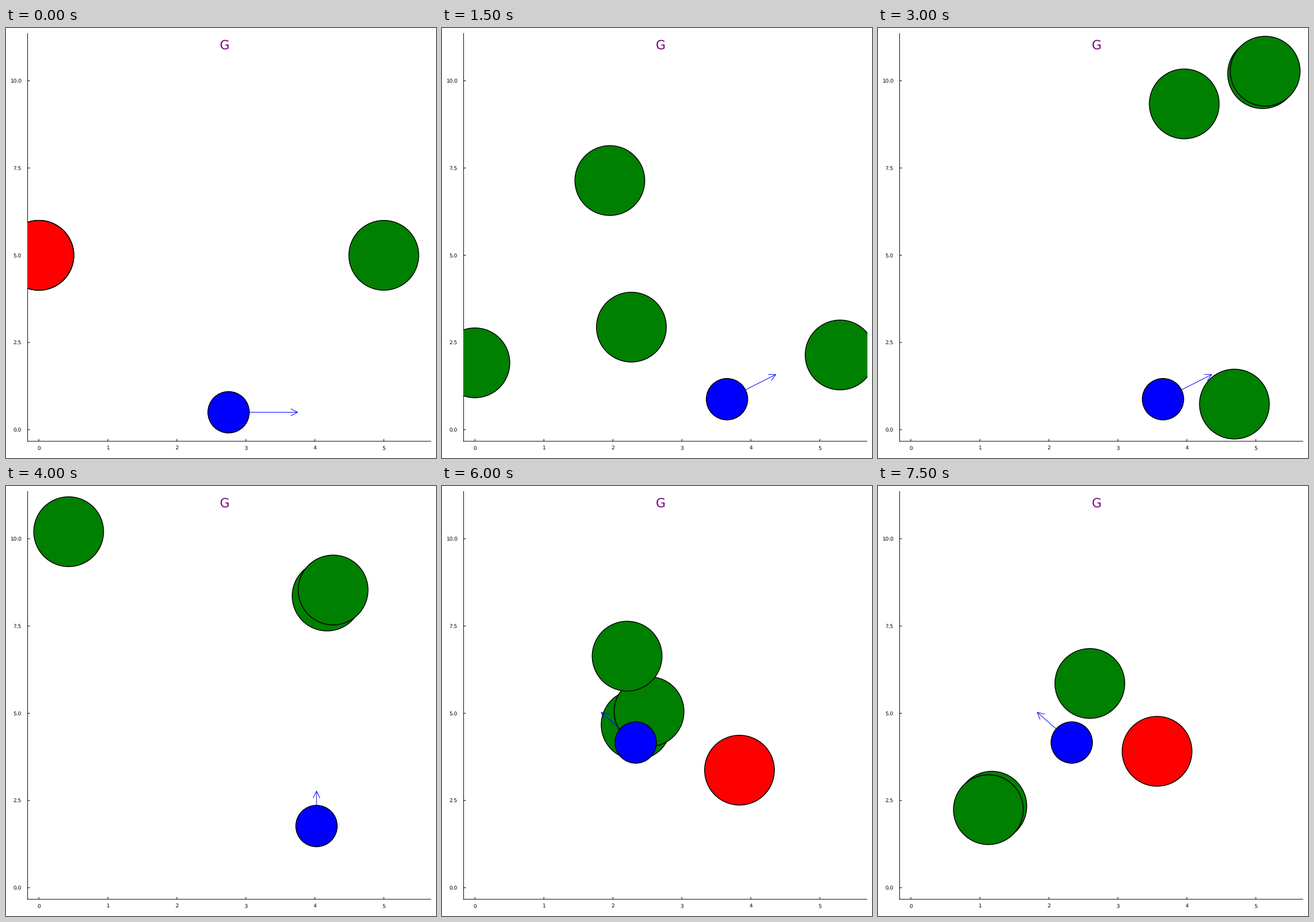
A matplotlib script that plays this animation: 748 px wide and 748 px high, repeating every 8000 ms.

```python
import numpy as np
import matplotlib.pyplot as plt
from matplotlib.animation import FuncAnimation
from matplotlib.patches import Circle, Rectangle

plt.rcParams["text.hinting"] = "no_hinting"

SIZE, DPI = 748, 64
PT = 72 / DPI                      # points per pixel
FRAMES, INTERVAL = 16, 500
X0, Y0 = 57.2, 698.8               # data origin in pixels
UNIT = np.array([120, -60.7])      # pixels per data unit
LEFT, TOP, RIGHT, BOTTOM = 37.6, 9, 739.5, 718.9
GATE = (0, X0, 395.4)

# Discs in stacking order: way points (step, x, y) joined at constant speed,
# and the span of steps on which the disc is red.
DISCS = [
    ([GATE, (2, X0, 524.7), (4, X0, 640.2)], (4, 4)),
    ([(6, 669, 79.4), (12, 337.7, 415.4), (15, 198, 557)], None),
    ([(0, 657.2, 395.4), (2, 679, 502.5), (4, 706, 635)], None),
    ([(6, 673.5, 75.1), (12, 360.2, 392.5), (15, 192, 563)], None),
    ([GATE, (4, 420.2, 562), (6, 620, 654.2)], None),
    ([(8, 109, 79.5), (12, 322, 296), (14, 419, 394.8), (15, 368.5, 343.5)],
     None),
    ([GATE, (4, 370.2, 222), (7, 614, 87)], (0, 0)),
    ([(9, 675.5, 654.5), (10, 616.4, 594.2), (12, 517.5, 494.3),
      (14, 429.5, 404.8), (15, 485.4, 461.5)], (9, 15)),
]

# The agent goes one stride, turns by this many degrees, goes another stride.
TURNS = {2: 45, 8: 45, 9: 45, 10: 0, 11: -15}
STRIDE, FADE = 0.53, 0.987

fig = plt.figure(figsize=(SIZE / DPI, SIZE / DPI), dpi=DPI, facecolor="white")
ax = fig.add_axes([0, 0, 1, 1])
ax.set(xlim=(0, SIZE), ylim=(SIZE, 0))
ax.axis("off")
clip = Rectangle((37, TOP), 703, 710, transform=ax.transData)


def disc(radius, color, z):
    patch = Circle((0, 0), radius, fc=color, ec="black", lw=1.5 * PT, zorder=z)
    ax.add_patch(patch)
    patch.set_clip_path(clip)
    return patch


def line(xs, ys, color="black", z=0):
    return ax.plot(xs, ys, color=color, lw=PT, zorder=z, snap=False,
                   solid_capstyle="butt")[0]


def label(x, y, text, px, color="black", ha="center"):
    ax.text(x, y, text, fontsize=px * PT, color=color, ha=ha, va="baseline",
            family="DejaVu Sans", zorder=0)


def draw_axes():
    line([LEFT, LEFT], [TOP, BOTTOM + 0.5])
    line([LEFT - 0.5, RIGHT], [BOTTOM, BOTTOM])
    for n in range(6):
        x = X0 + n * UNIT[0]
        line([x, x], [BOTTOM, BOTTOM - 4])
        label(x, 733.4, str(n), 9)
    for v in np.arange(0, 10.1, 2.5):
        y = Y0 + v * UNIT[1]
        line([LEFT, LEFT + 4], [y, y])
        label(27, y + 3.3, f"{v:.1f}", 9, ha="right")
    label(380.3, 36.6, "G", 22, "purple")


draw_axes()
discs = [disc(60.7, "green", i + 1) for i in range(len(DISCS))]
shaft = line([], [], "blue", 20)
head = line([], [], "blue", 20)
agent = disc(36, "blue", 21)


def ahead(deg):
    a = np.radians(deg)
    return np.array([np.cos(a), np.sin(a)])


def agent_pose(step):
    pos, deg, stride = np.array([2.75, 0.5]), 0, STRIDE
    for when, turn in TURNS.items():
        if when <= step:
            pos = pos + stride * (ahead(deg) + ahead(deg + turn))
            deg += turn
            stride *= FADE
    return (X0, Y0) + pos * UNIT, ahead(deg) * UNIT


def place_agent(step):
    center, vec = agent_pose(step)
    tip = center + vec
    unit = vec / np.hypot(*vec)
    side = 6 * np.array([-unit[1], unit[0]])
    back = tip - 11.8 * unit
    agent.center = center
    shaft.set_data(*zip(center, tip))
    head.set_data(*zip(back + side, tip, back - side))


def update(step):
    for patch, (path, red) in zip(discs, DISCS):
        steps, xs, ys = zip(*path)
        patch.set_visible(steps[0] <= step <= steps[-1])
        patch.center = np.interp(step, steps, xs), np.interp(step, steps, ys)
        is_red = red is not None and red[0] <= step <= red[1]
        patch.set_facecolor("red" if is_red else "green")
    place_agent(step)
    return [*discs, shaft, head, agent]


anim = FuncAnimation(fig, update, frames=FRAMES, interval=INTERVAL,
                     init_func=lambda: update(0), repeat=True, repeat_delay=0)
plt.show()
```
